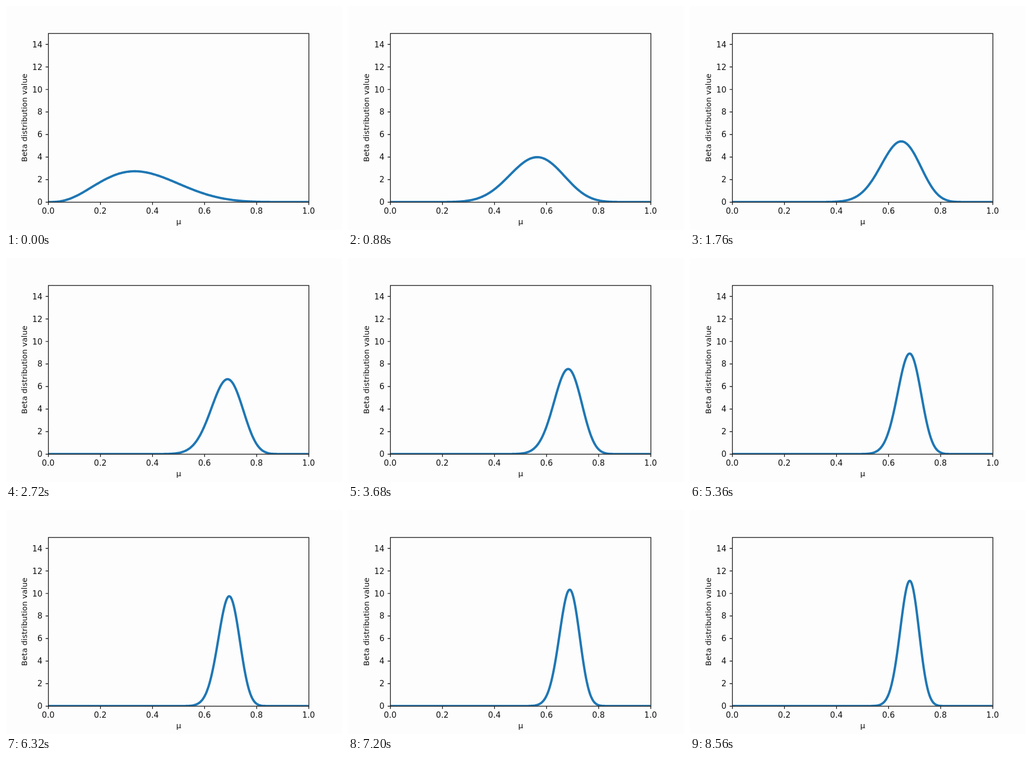
Recreate the animation shown at these times as an HTML page. Size 640 by 427 pixels, loop 8.64 s.

```html
<!DOCTYPE html>
<html lang="en">
<head>
<meta charset="utf-8">
<title>Beta distribution</title>
<style>
  html, body { margin: 0; width: 100%; height: 100%; overflow: hidden; background: #fdfdfd; }
  svg { display: block; width: 100vw; height: 100vh; }
  text { font: 14.8px "DejaVu Sans", sans-serif; fill: #111; }
  #labels text { font-size: 15.2px; }
  .axes { fill: none; stroke: #1c1c1c; stroke-width: 1.45; }
  #curve { fill: none; stroke: #1f77b4; stroke-width: 4.4; stroke-linejoin: round; }
</style>
</head>
<body>
<svg viewBox="0 0 640 427" preserveAspectRatio="none">
  <clipPath id="plot"><rect x="80" y="51.5" width="497" height="322.8"/></clipPath>
  <path id="curve" clip-path="url(#plot)"/>
  <path id="ticks" class="axes"/>
  <rect class="axes" x="80.7" y="52.4" width="496.2" height="321.6"/>
  <g id="labels"></g>
  <text x="329" y="416.2" text-anchor="middle">μ</text>
  <text transform="translate(39.6 213) rotate(-90)" text-anchor="middle">Beta distribution value</text>
</svg>
<script>
const FRAME_MS = 80, FRAME_COUNT = 108;
const px = x => 80 + 496 * x;
const py = y => 373.7 - 21.476 * y;
const $ = id => document.getElementById(id);

// [trials, successes] along the run of observations
const HISTORY = [[9, 3], [40, 26], [47, 33], [56, 38], [58, 40], [71, 50], [73, 50],
  [76, 52], [89, 62], [106, 72], [107, 73], [121, 85], [122, 85], [139, 96],
  [142, 98], [155, 107], [165, 114], [167, 114]];

function successesAfter(trials) {
  const i = Math.max(1, HISTORY.findIndex(([n]) => n >= trials));
  const [n0, k0] = HISTORY[i - 1], [n1, k1] = HISTORY[i];
  return Math.round(k0 + (k1 - k0) * (trials - n0) / (n1 - n0));
}

function logFactorial(n) {
  let sum = 0;
  for (let i = 2; i <= n; i++) sum += Math.log(i);
  return sum;
}

function curvePath(trials, hits) {
  const misses = trials - hits;
  const logScale = logFactorial(trials + 1) - logFactorial(hits) - logFactorial(misses);
  const points = [];
  for (let i = 0; i <= 300; i++) {
    const x = i / 300;
    const y = Math.exp(logScale + hits * Math.log(x) + misses * Math.log(1 - x));
    points.push(px(x).toFixed(2) + " " + py(y).toFixed(2));
  }
  return "M" + points.join("L");
}

function addLabel(text, x, y, anchor) {
  const label = document.createElementNS("http://www.w3.org/2000/svg", "text");
  label.setAttribute("x", x);
  label.setAttribute("y", y);
  label.setAttribute("text-anchor", anchor);
  label.textContent = text;
  $("labels").append(label);
}

function buildAxes() {
  let ticks = "";
  for (let i = 0; i <= 5; i++) {
    const x = px(i / 5);
    ticks += `M${x + 0.7} 374v5.2`;
    addLabel((i / 5).toFixed(1), x + 0.4, 396.2, "middle");
  }
  for (let value = 0; value <= 14; value += 2) {
    const y = py(value) + 0.2;
    ticks += `M80.7 ${y}h-5.2`;
    addLabel(value, 69.4, y + 5.4, "end");
  }
  $("ticks").setAttribute("d", ticks);
}

let shown = -1;
function render(now) {
  const step = Math.floor(now / FRAME_MS) % FRAME_COUNT;
  if (step !== shown) {
    shown = step;
    const trials = Math.max(9, Math.floor(7 + 1.5 * step));
    $("curve").setAttribute("d", curvePath(trials, successesAfter(trials)));
  }
}

buildAxes();
render(0);
const start = performance.now();
requestAnimationFrame(function tick() {
  render(performance.now() - start);
  requestAnimationFrame(tick);
});
</script>
</body>
</html>
```
